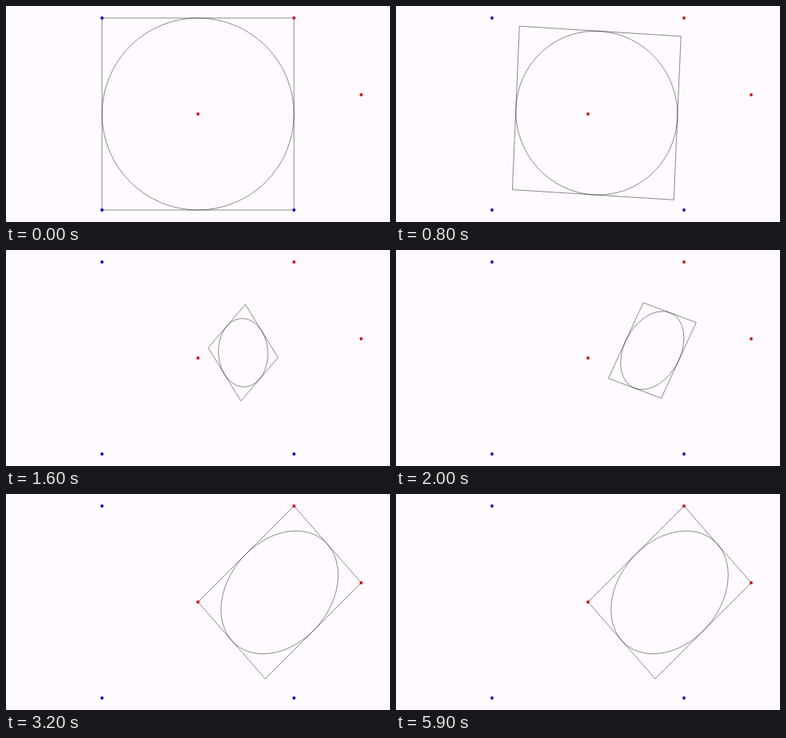
Animation, 480 px wide and 270 px high, one loop 6100 ms. Source, as an HTML page with a canvas:

```html
<!DOCTYPE html>
<html>
<head>
<meta charset="utf-8">
<style>
  html, body { margin: 0; overflow: hidden; background: #fefaff; }
  canvas { display: block; }
</style>
</head>
<body>
<canvas width="480" height="270"></canvas>
<script>
const ctx = document.querySelector('canvas').getContext('2d');
const LOOP = 6100, MOVE = 3034, RAMP = 556;

// Affine maps of the unit square [-1, 1]²: x axis, y axis, centre
const from = [120, 0, 0, 120, 240, 135];
const to = [-60, 60, -42, -48, 342, 123];

const blue = [[120, 15], [120, 255], [360, 255]];
const red = [[240, 135], [360, 15], [444, 111]];

// Constant speed with linear ramps at both ends, 0 to 1
function ramped(t) {
  if (t > MOVE / 2) return 1 - ramped(MOVE - t);
  if (t <= 0) return 0;
  const distance = t < RAMP ? t * t / (2 * RAMP) : t - RAMP / 2;
  return distance / (MOVE - RAMP);
}

const ease = t => (1 - Math.cos(Math.PI * ramped(t))) / 2;

function dots(points, color) {
  ctx.fillStyle = color;
  for (const [x, y] of points) {
    ctx.beginPath();
    ctx.arc(x, y, 1.9, 0, 2 * Math.PI);
    ctx.fill();
  }
}

function draw(t) {
  ctx.fillStyle = '#fefaff';
  ctx.fillRect(0, 0, 480, 270);

  const p = ease(t);
  ctx.beginPath();
  ctx.setTransform(...from.map((a, i) => a + (to[i] - a) * p));
  ctx.rect(-1, -1, 2, 2);
  ctx.moveTo(1, 0);
  ctx.arc(0, 0, 1, 0, 2 * Math.PI);
  ctx.resetTransform();
  ctx.lineWidth = 0.45;
  ctx.strokeStyle = '#000';
  ctx.stroke();

  dots(blue, '#0000e0');
  dots(red, '#e00010');
}

const start = performance.now();
function tick() {
  draw((performance.now() - start) % LOOP);
  requestAnimationFrame(tick);
}
tick();
</script>
</body>
</html>
```
